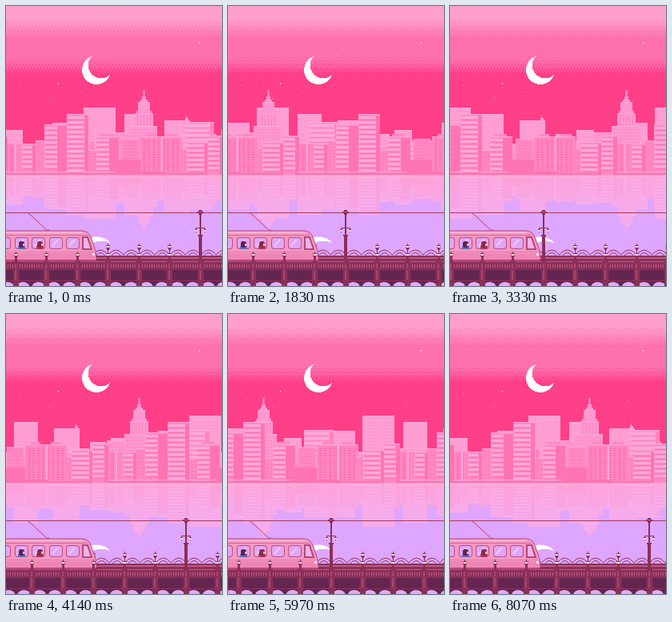
An HTML page with a canvas for the animation above (8.1 s loop, 270 by 350 pixels).

```html
<!DOCTYPE html>
<html lang="en">
<head>
<meta charset="utf-8">
<title>Night tram</title>
<style>
html, body { margin: 0; width: 100%; height: 100%; overflow: hidden; background: #ff3f88; }
canvas { display: block; width: 270px; height: 350px; image-rendering: pixelated; }
</style>
</head>
<body>
<canvas id="stage" width="270" height="350"></canvas>
<script>
const W = 270, H = 350, SHORE = 211, SQUASH = 0.66, FRAME = 30, FRAMES = 270;
const stage = document.getElementById('stage').getContext('2d');
stage.imageSmoothingEnabled = false;

function layer(draw) {
  const c = document.createElement('canvas');
  c.width = W;
  c.height = H;
  draw(c.getContext('2d'));
  return c;
}

// A layer whose content wraps around horizontally.
function tile(draw) {
  return layer(g => {
    for (const dx of [-W, 0, W]) {
      g.setTransform(1, 0, 0, 1, dx, 0);
      draw(g);
    }
  });
}

function box(g, color, x, y, w, h) {
  g.fillStyle = color;
  g.fillRect(x, y, w, h);
}

function line(g, color, width, ...pts) {
  g.strokeStyle = color;
  g.lineWidth = width;
  g.beginPath();
  for (let i = 0; i < pts.length; i += 2) g.lineTo(pts[i], pts[i + 1]);
  g.stroke();
}

function round(g, color, x, y, w, h, r) {
  g.fillStyle = color;
  g.beginPath();
  g.roundRect(x, y, w, h, r);
  g.fill();
}

function scroll(g, img, shift) {
  const x = -(shift % W);
  g.drawImage(img, x, 0);
  g.drawImage(img, x + W, 0);
}

// ---- Sky, moon and water ----
const BAYER = [0, 8, 2, 10, 12, 4, 14, 6, 3, 11, 1, 9, 15, 7, 13, 5];

function blend(g, color, top, bottom) {
  for (let y = top; y < bottom; y++)
    for (let x = 0; x < W; x++)
      if ((y - top) / (bottom - top) * 16 > BAYER[y % 4 * 4 + x % 4]) box(g, color, x, y, 1, 1);
}

const moon = layer(g => {
  for (let y = 58; y < 100; y++)
    for (let x = 92; x < 134; x++)
      if (Math.hypot(x - 112.5, y - 79.5) < 18 && Math.hypot(x - 118.5, y - 73.5) > 16.3)
        box(g, '#fff', x, y, 1, 1);
});

const sky = layer(g => {
  box(g, '#ff9fcd', 0, 0, W, H);
  blend(g, '#ff70ae', 16, 40);
  box(g, '#ff70ae', 0, 40, W, H);
  blend(g, '#ff3f88', 67, 86);
  box(g, '#ff3f88', 0, 86, W, H);
  for (const [x, y] of [[112, 10], [136, 60], [65, 97], [16, 99], [94, 107], [222, 108], [55, 115]])
    box(g, '#ffc4e0', x, y, 1, 1);
  box(g, '#fff', 65, 96, 1, 2);
  g.drawImage(moon, 0, 0);
});

function mirror(g, img, alpha, drop = 0) {
  g.save();
  g.globalAlpha = alpha;
  g.setTransform(1, 0, 0, -SQUASH, 0, SHORE * (1 + SQUASH) + drop);
  g.drawImage(img, 0, 0);
  g.restore();
}

const water = layer(g => {
  const grad = g.createLinearGradient(0, SHORE, 0, 262);
  grad.addColorStop(0, '#ff9ad6');
  grad.addColorStop(0.4, '#f0a2ea');
  grad.addColorStop(0.75, '#dfa6ff');
  box(g, grad, 0, SHORE, W, H);
  for (const [x, y] of [[94, 275], [223, 273], [138, 309], [190, 288]]) box(g, '#f3d6ff', x, y, 1, 1);
  mirror(g, moon, 1, 3);
});

// ---- City: buildings are [x, top, width, style] ----
const BACK = { body: '#ff9fd4', dark: '#ff94cd', light: '#ffaedc' };
const MID = { body: '#ff97d0', dark: '#ff84bf', light: '#ffaada' };
const FRONT = { body: '#ff88c3', dark: '#ff74b3', light: '#ffa8da' };
const PLAIN = 0, BALCONY = 1, GRID = 2, HALF = 3;

function building(g, c, [x, top, w, style]) {
  box(g, c.body, x, top, w, SHORE - top);
  box(g, c.light, x, top, w, 1);
  if (style === PLAIN) {
    for (let y = top + 4; y < 206; y += 4)
      for (let i = 3; i < w - 2; i += 4) box(g, c.dark, x + i, y, 2, 1);
  } else if (style === GRID) {
    for (let i = 3; i < w - 3; i += 6)
      for (let y = top + 4; y < 207; y += 3) box(g, c.dark, x + i, y, i % 12 === 3 ? 4 : 3, 2);
    box(g, c.light, x + (w >> 1), top, 2, SHORE - top);
  } else {
    const wide = style === HALF ? w * 0.6 | 0 : w - 5;
    box(g, c.dark, x + wide, top + 2, w - wide, SHORE - top - 2);
    for (let y = top + 3; y < 205; y += 6) {
      box(g, c.light, x, y, wide, 3);
      box(g, c.dark, x + 2, y + 4, wide - 3, 1);
    }
  }
}

const backCity = tile(g => {
  box(g, BACK.body, 0, 172, W, SHORE - 172);
  for (const b of [[-1, 155, 22, PLAIN], [58, 146, 30, PLAIN], [97, 127, 40, PLAIN],
    [148, 135, 30, PLAIN], [198, 143, 32, PLAIN], [243, 160, 20, PLAIN]]) building(g, BACK, b);
  box(g, BACK.body, 224, 140, 4, 4);
  box(g, BACK.body, 225, 137, 1, 3);
});

const midCity = tile(g => {
  for (const b of [[20, 174, 40, PLAIN], [62, 168, 48, BALCONY], [132, 158, 30, PLAIN],
    [223, 145, 37, BALCONY], [190, 172, 33, PLAIN]]) building(g, MID, b);
  // Stepped tower with a spire
  for (const [half, top] of [[0.5, 105], [2, 113], [4, 117], [7, 120], [6, 124], [9, 131], [11, 134]])
    box(g, MID.body, 172 - half, top, half * 2 + 1, SHORE - top);
  box(g, MID.light, 165, 120, 15, 1);
  box(g, MID.light, 161, 134, 23, 1);
  building(g, MID, [154, 150, 35, PLAIN]);
  for (let x = 164; x < 182; x += 4) box(g, MID.dark, x, 136, 1, 14);
});

const frontCity = tile(g => {
  for (const b of [[-18, 162, 20, BALCONY], [2, 171, 18, GRID], [20, 172, 18, BALCONY], [37, 168, 12, PLAIN],
    [48, 148, 28, HALF], [76, 135, 27, BALCONY], [103, 180, 11, PLAIN], [113, 163, 28, HALF],
    [145, 166, 21, PLAIN], [168, 163, 52, GRID], [220, 178, 7, PLAIN], [226, 170, 27, BALCONY]])
    building(g, FRONT, b);
  box(g, FRONT.dark, 141, 192, 27, 19);
  box(g, FRONT.body, 118, 160, 16, 3);
  box(g, FRONT.body, 175, 160, 12, 3);
  box(g, FRONT.body, 200, 160, 14, 3);
  box(g, FRONT.dark, 137, 207, 60, 2);
  box(g, FRONT.light, 0, 207, 137, 1);
  box(g, '#f874b2', 0, 209, W, 2);
});

const city = layer(() => {}).getContext('2d');

function drawCity(n) {
  city.clearRect(0, 0, W, H);
  scroll(city, backCity, n);
  scroll(city, midCity, n * 2);
  scroll(city, frontCity, n * 3);
  stage.drawImage(city.canvas, 0, 0);
  // Pale tint for the reflection only
  city.globalCompositeOperation = 'source-atop';
  box(city, '#ffb8eab0', 0, 0, W, H);
  city.globalCompositeOperation = 'source-over';
  mirror(stage, city.canvas, 0.7);
}

// ---- Bridge ----
const MAROON = '#8b3058', DARK = '#632651', ROSE = '#bd5a88', GLOW = '#ffe3d8';
const posts = Array.from({ length: 7 }, (_, i) => Math.round(243 - i * W / 7));

function lamp(g, x, y) {
  box(g, MAROON, x, y - 2, 1, 2);
  box(g, MAROON, x - 2, y, 5, 1);
  box(g, GLOW, x - 1, y + 1, 3, 2);
  box(g, MAROON, x - 2, y + 3, 5, 1);
  box(g, MAROON, x - 1, y + 4, 3, 2);
}

const rearRail = tile(g => {
  g.strokeStyle = MAROON;
  g.lineWidth = 1;
  for (let i = 0; i < 14; i++) {
    const x = 243.5 - i * W / 14;
    g.beginPath();
    g.moveTo(x, 311);
    g.quadraticCurveTo(x + 9.6, 299, x + 19.3, 311);
    g.moveTo(x + 4, 312);
    g.quadraticCurveTo(x + 9.6, 305, x + 15.3, 312);
    g.stroke();
  }
  box(g, MAROON, 0, 312, W, 2);
  box(g, ROSE, 0, 314, W, 2);
  box(g, MAROON, 0, 316, W, 3);
  box(g, ROSE, 0, 319, W, 2);
  for (const x of posts.slice(1)) {
    lamp(g, x, 299);
    box(g, MAROON, x, 305, 1, 8);
  }
});

const frontRail = tile(g => {
  box(g, MAROON, 0, 320, W, 3);
  box(g, ROSE, 0, 323, W, 4);
  for (let x = 0; x < W; x += 3) box(g, MAROON, x, 323, 2, 4);
  box(g, MAROON, 0, 327, W, 3);
  box(g, DARK, 0, 330, W, 20);
  for (let i = 0; i < 14; i++) {
    g.fillStyle = '#e0acf8';
    g.beginPath();
    g.ellipse(243 + W / 28 - i * W / 14, 351, 8, 6, 0, 0, 7);
    g.fill();
  }
  box(g, MAROON, 0, 343, W, 1);
  for (const x of posts) {
    lamp(g, x, 309);
    box(g, MAROON, x - 1, 314, 3, 6);
    box(g, MAROON, x - 3, 319, 7, 31);
    box(g, '#a6466f', x - 1, 322, 2, 22);
    box(g, MAROON, x - 5, 328, 11, 2);
    box(g, MAROON, x - 5, 342, 11, 2);
  }
  // Tall pole carrying the wire
  const x = 243;
  box(g, MAROON, x - 1, 256, 2, 66);
  box(g, MAROON, x - 4, 257, 8, 2);
  box(g, MAROON, x - 2, 255, 4, 6);
  box(g, ROSE, x - 2, 257, 4, 1);
  line(g, MAROON, 1, x - 5.5, 281, x - 5.5, 277.5, x + 5.5, 277.5, x + 5.5, 281);
  for (const dx of [-6, 5]) {
    box(g, MAROON, x + dx - 1, 279, 3, 1);
    box(g, GLOW, x + dx - 1, 280, 3, 2);
    box(g, MAROON, x + dx, 282, 1, 1);
  }
  box(g, MAROON, x - 3, 286, 6, 2);
  box(g, MAROON, x - 2, 288, 4, 34);
});

// ---- Tram ----
function passenger(g, x, hair, clothes) {
  round(g, clothes, x - 4, 299, 9, 5, 2);
  round(g, hair, x - 3, 294, 7, 8, 3);
  box(g, '#ffb5b4', x + 2, 297, 2, 3);
}

const tram = layer(g => {
  box(g, '#a33a5f', 0, 258, W, 1);
  line(g, '#c23563', 1, 28, 259.5, 31, 261.5, 53, 282);
  line(g, '#c23563', 1, 48, 282, 53, 282, 53, 279);
  g.beginPath();
  g.moveTo(-2, 281);
  g.lineTo(95, 281);
  g.quadraticCurveTo(103, 281, 106, 289);
  g.lineTo(112, 306);
  g.lineTo(113, 317);
  g.lineTo(108, 321);
  g.lineTo(-2, 321);
  g.closePath();
  g.fillStyle = '#f797c3';
  g.fill();
  g.strokeStyle = '#b4477a';
  g.lineWidth = 1;
  g.stroke();
  box(g, '#ffb0d0', 0, 282, 96, 2);
  box(g, '#d7689a', 0, 286, 102, 1);
  box(g, '#e27bab', 0, 307, 110, 1);
  box(g, '#ee86b5', 0, 309, 111, 8);
  box(g, '#b4477a', 0, 317, 112, 4);
  for (const x of [-10, 12, 33, 55, 76]) {
    round(g, '#b9527f', x - 1, 289, 17, 15, 4);
    round(g, '#dfa6f6', x, 290, 15, 13, 3);
    line(g, '#f1c6fb', 2, x + 3, 300, x + 10, 292);
  }
  passenger(g, 19, '#5a2350', '#5f6fb5');
  passenger(g, 42, '#8c2848', '#a53a5c');
  g.beginPath();
  for (const [x, y] of [[96, 289], [102, 289], [107, 304], [96, 304]]) g.lineTo(x, y);
  g.closePath();
  g.fillStyle = '#f2b2ea';
  g.fill();
  g.strokeStyle = '#b4477a';
  g.stroke();
  box(g, '#ffe0ec', 108, 309, 3, 3);
});

function drawStars(n) {
  const phase = n % 90;
  box(stage, '#fff', 241, 45, 1, 2);
  if (phase > 9 && phase < 17) {
    box(stage, '#ffd3e8', 241, 42, 1, 7);
    box(stage, '#ffd3e8', 238, 45, 7, 1);
  }
  const age = n - 206;
  if (age >= 0 && age < 22) {
    const x = 5 + age * 5, y = 18 + age * 5.8;
    line(stage, '#ffd3e8', 1, x, y, x + 6, y + 7);
  }
}

function render(now) {
  const n = Math.floor(now / FRAME) % FRAMES;
  stage.drawImage(sky, 0, 0);
  drawStars(n);
  stage.drawImage(water, 0, 0);
  drawCity(n);
  box(stage, '#ffb5dc', 0, 213, W, 1);
  scroll(stage, rearRail, n * 6);
  stage.drawImage(tram, 0, 0);
  scroll(stage, frontRail, n * 6);
}

const start = performance.now();
function tick() {
  render(performance.now() - start);
  requestAnimationFrame(tick);
}
tick();
</script>
</body>
</html>
```
